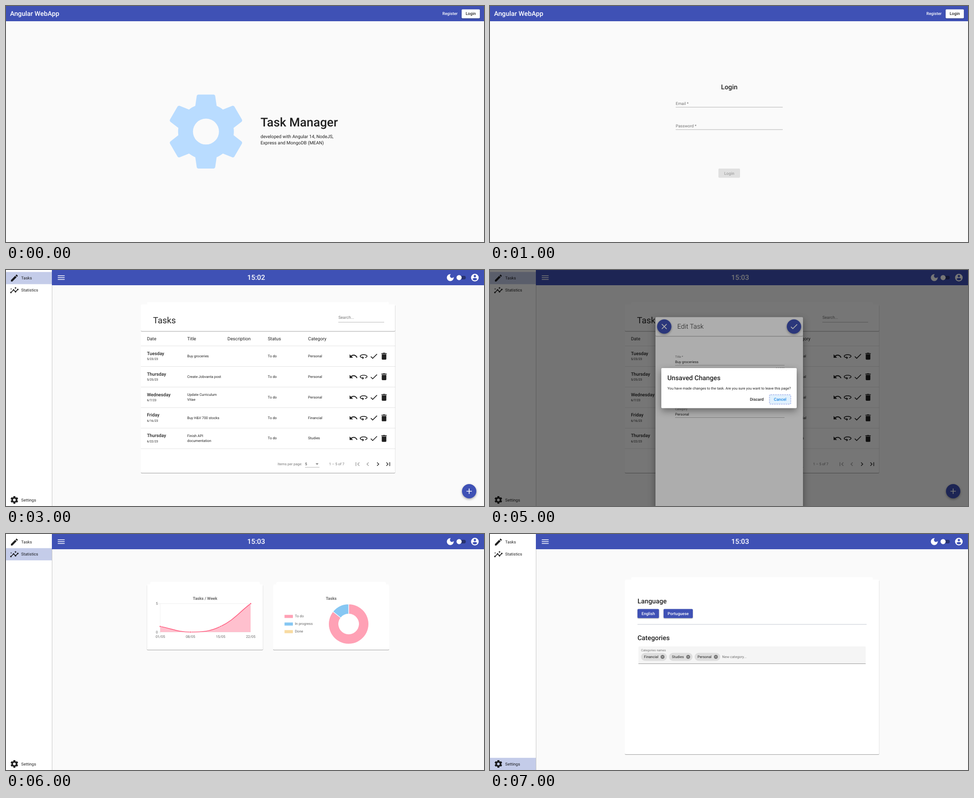
Write an HTML page that moves like this. It is 1063x527 px and loops after 8000 ms.

```html
<!DOCTYPE html>
<html lang="en">
<head>
<meta charset="utf-8">
<title>Task Manager</title>
<style>
html, body { margin: 0; width: 100%; height: 100%; overflow: hidden; background: #fafafa; }
svg { display: block; width: 1063px; height: 527px; font-family: Roboto, sans-serif; text-rendering: geometricPrecision; }
.card { filter: drop-shadow(0 1px .7px rgba(0,0,0,.38)); }
.btn { filter: drop-shadow(0 1px 1px rgba(0,0,0,.35)); }
.fab { filter: drop-shadow(0 2px 2.5px rgba(0,0,0,.35)); }
.modal { filter: drop-shadow(0 6px 8px rgba(0,0,0,.4)); }
</style>
</head>
<body>
<svg id="stage" viewBox="0 0 1063 527"></svg>
<script>
const BLUE = '#3f51b5', INK = 'rgba(0,0,0,.87)', GREY = 'rgba(0,0,0,.54)', LINE = 'rgba(0,0,0,.42)', PALE = 'rgba(0,0,0,.28)';

// Text sizes of the page, scaled to the stage
const XS = 5.95, S = 6.8, M = 7.94, L = 9.07, XL = 10.2, H = 14.74;

const ICONS = {
  gear: 'M19.43 12.98c.04-.32.07-.64.07-.98s-.03-.66-.07-.98l2.11-1.65c.19-.15.24-.42.12-.64l-2-3.46c-.12-.22-.39-.3-.61-.22l-2.49 1c-.52-.4-1.08-.73-1.69-.98l-.38-2.65C14.46 2.18 14.25 2 14 2h-4c-.25 0-.46.18-.49.42l-.38 2.65c-.61.25-1.17.59-1.69.98l-2.49-1c-.23-.09-.49 0-.61.22l-2 3.46c-.13.22-.07.49.12.64l2.11 1.65c-.04.32-.07.65-.07.98s.03.66.07.98l-2.11 1.65c-.19.15-.24.42-.12.64l2 3.46c.12.22.39.3.61.22l2.49-1c.52.4 1.08.73 1.69.98l.38 2.65c.03.24.24.42.49.42h4c.25 0 .46-.18.49-.42l.38-2.65c.61-.25 1.17-.59 1.69-.98l2.49 1c.23.09.49 0 .61-.22l2-3.46c.12-.22.07-.49-.12-.64zM12 15.5a3.5 3.5 0 1 1 0-7a3.5 3.5 0 1 1 0 7z',
  pencil: 'M3 17.25V21h3.75L17.81 9.94l-3.75-3.75zM20.71 7.04c.39-.39.39-1.02 0-1.41l-2.34-2.34c-.39-.39-1.02-.39-1.41 0l-1.83 1.83 3.75 3.75z',
  insights: 'M21 8c-1.45 0-2.26 1.44-1.93 2.51l-3.55 3.56c-.3-.09-.74-.09-1.04 0l-2.55-2.55C12.27 10.45 11.46 9 10 9c-1.45 0-2.27 1.44-1.93 2.52l-4.56 4.55C2.44 15.74 1 16.55 1 18c0 1.1.9 2 2 2 1.45 0 2.26-1.44 1.93-2.51l4.55-4.56c.3.09.74.09 1.04 0l2.55 2.55C12.73 16.55 13.54 18 15 18c1.45 0 2.27-1.44 1.93-2.52l3.56-3.55C21.56 12.26 23 11.45 23 10c0-1.1-.9-2-2-2zM15 9l.94-2.07L18 6l-2.06-.93L15 3l-.92 2.07L12 6l2.08.93zM3.5 11L4 9l2-.5L4 8l-.5-2L3 8l-2 .5L3 9z',
  menu: 'M3 18h18v-2H3zm0-5h18v-2H3zm0-7v2h18V6z',
  moon: 'M12 3a9 9 0 1 0 9 9c0-.46-.04-.92-.1-1.36A5.4 5.4 0 1 1 13.36 3.1C12.92 3.04 12.46 3 12 3z',
  user: 'M12 2a10 10 0 1 0 0 20a10 10 0 1 0 0-20zm0 3a3 3 0 1 1 0 6a3 3 0 1 1 0-6zm0 14.2c-2.5 0-4.71-1.28-6-3.22.03-1.99 4-3.08 6-3.08 1.99 0 5.97 1.09 6 3.08-1.29 1.94-3.5 3.22-6 3.22z',
  undo: 'M12.5 8c-2.65 0-5.05.99-6.9 2.6L2 7v9h9l-3.62-3.62c1.39-1.16 3.16-1.88 5.12-1.88 3.54 0 6.55 2.31 7.6 5.5l2.37-.78C21.08 11.03 17.15 8 12.5 8z',
  turn: 'M12 7C6.48 7 2 9.24 2 12c0 2.24 2.94 4.13 7 4.77V20l4-4-4-4v2.73c-3.15-.56-5-1.9-5-2.73 0-1.06 3.04-3 8-3s8 1.94 8 3c0 .73-1.46 1.89-4 2.53v2.05c3.53-.77 6-2.53 6-4.58 0-2.76-4.48-5-10-5z',
  check: 'M9 16.2L4.8 12l-1.4 1.4L9 19 21 7l-1.4-1.4z',
  trash: 'M6 19c0 1.1.9 2 2 2h8c1.1 0 2-.9 2-2V7H6zM19 4h-3.5l-1-1h-5l-1 1H5v2h14z',
  first: 'M18.41 16.59L13.82 12l4.59-4.59L17 6l-6 6 6 6zM6 6h2v12H6z',
  prev: 'M15.41 7.41L14 6l-6 6 6 6 1.41-1.41L10.83 12z',
  next: 'M10 6L8.59 7.41 13.17 12l-4.58 4.59L10 18l6-6z',
  last: 'M5.59 7.41L10.18 12l-4.59 4.59L7 18l6-6-6-6zM16 6h2v12h-2z',
  plus: 'M19 13h-6v6h-2v-6H5v-2h6V5h2v6h6z',
  cross: 'M19 6.41L17.59 5 12 10.59 6.41 5 5 6.41 10.59 12 5 17.59 6.41 19 12 13.41 17.59 19 19 17.59 13.41 12z',
  calendar: 'M19 3h-1V1h-2v2H8V1H6v2H5c-1.1 0-2 .9-2 2v14c0 1.1.9 2 2 2h14c1.1 0 2-.9 2-2V5c0-1.1-.9-2-2-2zm0 16H5V8h14zM7 10h5v5H7z'
};

const text = (x, y, str, size = M, fill = INK, weight = 400, anchor = 'start') =>
  `<text x="${x}" y="${y}" font-size="${size}" fill="${fill}" font-weight="${weight}" text-anchor="${anchor}">${str}</text>`;
const rect = (x, y, x2, y2, fill, r = 0, extra = '') =>
  `<rect x="${x}" y="${y}" width="${x2 - x}" height="${y2 - y}" rx="${r}" fill="${fill}" ${extra}/>`;
const circle = (x, y, r, fill, extra = '') => `<circle cx="${x}" cy="${y}" r="${r}" fill="${fill}" ${extra}/>`;
const path = (d, fill, extra = '') => `<path d="${d}" fill="${fill}" ${extra}/>`;
const hline = (x, x2, y, color = LINE, w = .7) => rect(x, y - w / 2, x2, y + w / 2, color);
const icon = (name, x, y, size = 20.4, fill = INK) =>
  path(ICONS[name], fill, `transform="translate(${x - size / 2} ${y - size / 2}) scale(${size / 24})"`);
const fab = (x, y, name, on = true) =>
  circle(x, y, 16, on ? BLUE : '#e0e0e0', on ? 'class="fab"' : '') + icon(name, x, y, 20.4, on ? '#fff' : PALE);
const shade = () => rect(0, 0, 1063, 527, 'rgba(0,0,0,.32)');
const card = (x, y, x2, y2, inset) =>
  rect(x + inset, y - 5.5, x2 - inset, y + 4, '#fff', 3) + rect(x, y, x2, y2, '#fff', 2, 'class="card"');

function landing() {
  return rect(0, 0, 1063, 34, BLUE) + text(9, 22.3, 'Angular WebApp', 14.7, '#fff', 500)
    + text(987.4, 20.4, 'Register', L, '#fff', 500, 'middle')
    + rect(1013.3, 7.5, 1053.8, 27.5, '#fff', 2, 'class="btn"')
    + text(1033.5, 20.4, 'Login', L, INK, 500, 'middle');
}

function home() {
  return landing() + icon('gear', 444.7, 280.4, 198.4, '#b9dcff')
    + text(566, 268.5, 'Task Manager', 27.2, INK, 500)
    + text(566, 295, 'developed with Angular 14, NodeJS,', XL)
    + text(566, 308.6, 'Express and MongoDB (MEAN)', XL);
}

function login(filled) {
  const field = (y, label, value) => (filled
    ? text(413, y - 16, label, S, GREY) + text(413, y - 5, value)
    : text(413, y - 5, label, L, GREY)) + hline(413, 651, y);
  return landing() + text(532, 186, 'Login', H, INK, 500, 'middle')
    + field(226, 'Email *', 'demo@mail.example') + field(276, 'Password *', '••••••••••')
    + rect(508, 363, 556, 383.5, filled ? BLUE : '#e0e0e0', 2, filled ? 'class="btn"' : '')
    + text(532, 376.5, 'Login', L, filled ? '#fff' : PALE, 500, 'middle');
}

function shell(active, clock) {
  const items = [['pencil', 'Tasks', 18], ['insights', 'Statistics', 45.2], ['gear', 'Settings', 513.4]];
  return rect(0, 0, 102, 527, '#fff') + rect(102, 34, 102.7, 527, 'rgba(0,0,0,.3)') + rect(102, 0, 1063, 34, BLUE)
    + items.map(([name, label, y], i) =>
        (i == active ? rect(0, y - 13.6, 102, y + 13.6, '#c4cce9') : '')
        + icon(name, 18.6, y) + text(33.8, y + 3.1, label, L)).join('')
    + icon('menu', 122.8, 17, 20.4, '#fff') + text(556.3, 22.4, clock, 15.7, '#fff', 500, 'middle')
    + icon('moon', 988, 17, 20.4, '#fff') + rect(1002.5, 13, 1022.5, 21, '#273270', 4)
    + circle(1007.6, 17, 5.7, '#fff') + icon('user', 1042.7, 17, 20.4, '#fff');
}

function tasks(clock) {
  const cols = [313.4, 403, 492.5, 582.3, 671.8];
  const rows = [
    ['Tuesday', '5/23/23', ['Buy groceries'], 'Personal'],
    ['Thursday', '5/25/23', ['Create Jobvanta post'], 'Personal'],
    ['Wednesday', '6/7/23', ['Update Curriculum', 'Vitae'], 'Personal'],
    ['Friday', '6/16/23', ['Buy H&amp;V 700 stocks'], 'Financial'],
    ['Thursday', '6/22/23', ['Finish API', 'documentation'], 'Studies']
  ];
  const row = ([day, date, title, category], i) => {
    const y = 192.2 + i * 45.9;
    return text(cols[0], y - 2.5, day, XL, INK, 500) + text(cols[0], y + 8.7, date, S)
      + title.map((t, k) => text(cols[1], y + 2.6 + (k - (title.length - 1) / 2) * 11.4, t)).join('')
      + text(cols[3], y + 2.6, 'To do') + text(cols[4], y + 2.6, category)
      + ['undo', 'turn', 'check', 'trash'].map((n, k) => icon(n, 772.6 + k * 22.7, y + .3)).join('')
      + hline(300, 865.5, y + 23.2, 'rgba(0,0,0,.14)', .8);
  };
  return shell(0, clock) + card(300, 77, 865.5, 453, 14)
    + rect(300, 77, 865.5, 136.4, '#fff', 2, 'class="card"')
    + text(327, 118.6, 'Tasks', 19.3) + text(739.2, 108.7, 'Search...', L, GREY) + hline(739, 841, 116.7)
    + ['Date', 'Title', 'Description', 'Status', 'Category'].map((t, i) => text(cols[i], 157, t, XL)).join('')
    + hline(300, 865.5, 169.4, 'rgba(0,0,0,.14)', .8) + rows.map(row).join('')
    + text(604, 436.2, 'Items per page:', M, GREY) + text(665, 436.2, '5') + hline(665, 697, 440.6)
    + path('M688.6 431.8h6.4l-3.2 3.2z', GREY) + text(718.6, 436.2, '1 – 5 of 7', M, GREY)
    + ['first', 'prev', 'next', 'last'].map((n, i) => icon(n, 781.8 + i * 22.7, 433.5, 17, i < 2 ? 'rgba(0,0,0,.38)' : INK)).join('')
    + fab(1030, 494, 'plus');
}

function edit(clock, title, changed) {
  const tint = changed ? GREY : BLUE;
  return tasks(clock) + shade() + rect(368, 105.5, 696, 540, '#fff', 2, 'class="modal"')
    + rect(368, 105.5, 696, 147.4, '#fff', 2, 'class="card"')
    + fab(387.5, 126.2, 'cross') + text(416.6, 131.4, 'Edit Task', H, INK, 300) + fab(676, 126.2, 'check', changed)
    + text(411.7, 196.4, 'Title *', S, tint) + text(411.7, 207.8, title)
    + (changed ? hline(411.7, 655, 212.8) : hline(411.7, 655, 213, BLUE, 1.2) + rect(459.7, 201, 460.3, 209.8, '#000'))
    + text(655, 221.8, `${title.length}/100`, XS, GREY, 400, 'end')
    + text(411.7, 245.3, 'Description', L, GREY) + hline(411.7, 655, 257.2)
    + path('M650 255l5-5M652.6 255l2.4-2.4', 'none', `stroke="${GREY}" stroke-width=".6"`)
    + text(655, 266.3, '0/300', XS, GREY, 400, 'end')
    + text(411.7, 276, 'Choose a due date', S, GREY) + text(411.7, 287.6, '5/23/2023')
    + icon('calendar', 643.7, 284.3, 13.6, 'rgba(0,0,0,.7)') + hline(411.7, 655, 294.4)
    + text(411.7, 312.8, 'Category', S, GREY) + text(411.7, 324.8, 'Personal') + hline(411.7, 655, 329.4);
}

function confirmLeave() {
  return edit('15:03', 'Buy groceriess', true) + shade() + rect(381, 219, 682, 308.5, '#fff', 2, 'class="modal"')
    + text(394.4, 246.3, 'Unsaved Changes', H, INK, 500)
    + text(394.6, 266.7, 'You have made changes to the task. Are you sure you want to leave this page?')
    + text(593.3, 292.2, 'Discard', L, INK, 500, 'middle')
    + rect(621.5, 278.5, 668.8, 299.5, '#e1f1fd', 2.5, 'stroke="#b3c0ee" stroke-width="1.8" stroke-dasharray="3.4 1.7"')
    + text(645.2, 292.2, 'Cancel', L, '#1e88e5', 500, 'middle');
}

function statistics() {
  const curve = 'M343 206.5C369.8 211.5 383.2 219 410 219S453 217.9 477 206.5C506.6 192.5 517.2 175.9 544 155.5';
  const points = [206.5, 219, 206.5, 155.5], dark = '#666';
  const colors = ['#ffa1b5', '#86c7f3', '#f8dba2'];
  const polar = (r, a) => `${762 + r * Math.sin(a)} ${201 - r * Math.cos(a)}`;
  const slice = (a, b, color) => {
    const big = b - a > Math.PI ? 1 : 0;
    return path(`M${polar(44.6, a)}A44.6 44.6 0 ${big} 1 ${polar(44.6, b)}L${polar(22.3, b)}A22.3 22.3 0 ${big} 0 ${polar(22.3, a)}Z`,
      color, 'stroke="#fff" stroke-width="1.2"');
  };
  const turn = 2 * Math.PI;
  return shell(1, '15:03') + card(313.5, 112.5, 571.5, 258.5, 7) + card(594, 112.5, 852, 258.5, 7)
    + text(442.7, 147.1, 'Tasks / Week', L, dark, 700, 'middle') + text(723.2, 147.1, 'Tasks', L, dark, 700, 'middle')
    + hline(338.5, 544, 155.5, 'rgba(0,0,0,.1)', .6) + hline(338.5, 544, 219, 'rgba(0,0,0,.1)', .6)
    + rect(342.7, 155.5, 343.3, 223, 'rgba(0,0,0,.1)')
    + path(curve + 'V219H343Z', 'rgba(255,99,132,.4)') + path(curve, 'none', 'stroke="#ff6384" stroke-width="1.7"')
    + points.map((y, i) => circle(343 + i * 67, y, 1.8, '#ff6384', 'stroke="#fff" stroke-width=".6"')).join('')
    + text(337.6, 158.2, '5', M, dark, 400, 'end') + text(337.6, 221.7, '0', M, dark, 400, 'end')
    + ['01', '08', '15', '22'].map((d, i) => text(343.2 + i * 67, 232.3, d + '/05', M, dark, 400, 'middle')).join('')
    + ['To do', 'In progress', 'Done'].map((t, i) =>
        rect(619.4, 180.6 + i * 17, 638, 187.5 + i * 17, colors[i]) + text(642.4, 186.4 + i * 17, t, M, dark)).join('')
    + slice(0, turn * 6 / 7, colors[0]) + slice(turn * 6 / 7, turn, colors[1]);
}

function settings() {
  const button = (x, x2, label) => rect(x, 167.5, x2, 187.8, BLUE, 2, 'class="btn"')
    + text((x + x2) / 2, 180.8, label, L, '#fff', 500, 'middle');
  const chip = (x, x2, label) => rect(x, 265.4, x2, 283.2, '#dedede', 8.9) + text(x + 6.6, 277, label)
    + circle(x2 - 9.7, 274.4, 4.3, '#707070') + icon('cross', x2 - 9.7, 274.4, 7.6, '#e0e0e0');
  return shell(2, '15:03') + card(300, 102, 865.5, 492, 14)
    + text(328, 155.2, 'Language', H, INK, 500) + button(328, 375.7, 'English') + button(386, 451, 'Portuguese')
    + hline(328, 837.5, 201.8, '#c0c6cf', 1) + text(328, 237.2, 'Categories', H, INK, 500)
    + rect(330, 251, 835.5, 290, '#f5f5f5', 2) + hline(330, 835.5, 289.7, 'rgba(0,0,0,.5)', .8)
    + text(336, 262.2, 'Categories names', S, GREY)
    + chip(336, 393.4, 'Financial') + chip(398, 450.4, 'Studies') + chip(455, 512, 'Personal')
    + text(516.3, 277, 'New category...', M, GREY);
}

const scenes = [
  home, () => login(false), () => login(true), () => tasks('15:02'),
  () => edit('15:02', 'Buy groceries', false), confirmLeave, statistics, settings
];
const stage = document.getElementById('stage');
const start = performance.now();
let shown = -1;

function draw() {
  const now = Math.floor((performance.now() - start) / 1000) % scenes.length;
  if (now !== shown) stage.innerHTML = scenes[shown = now]();
  requestAnimationFrame(draw);
}
draw();
</script>
</body>
</html>
```
